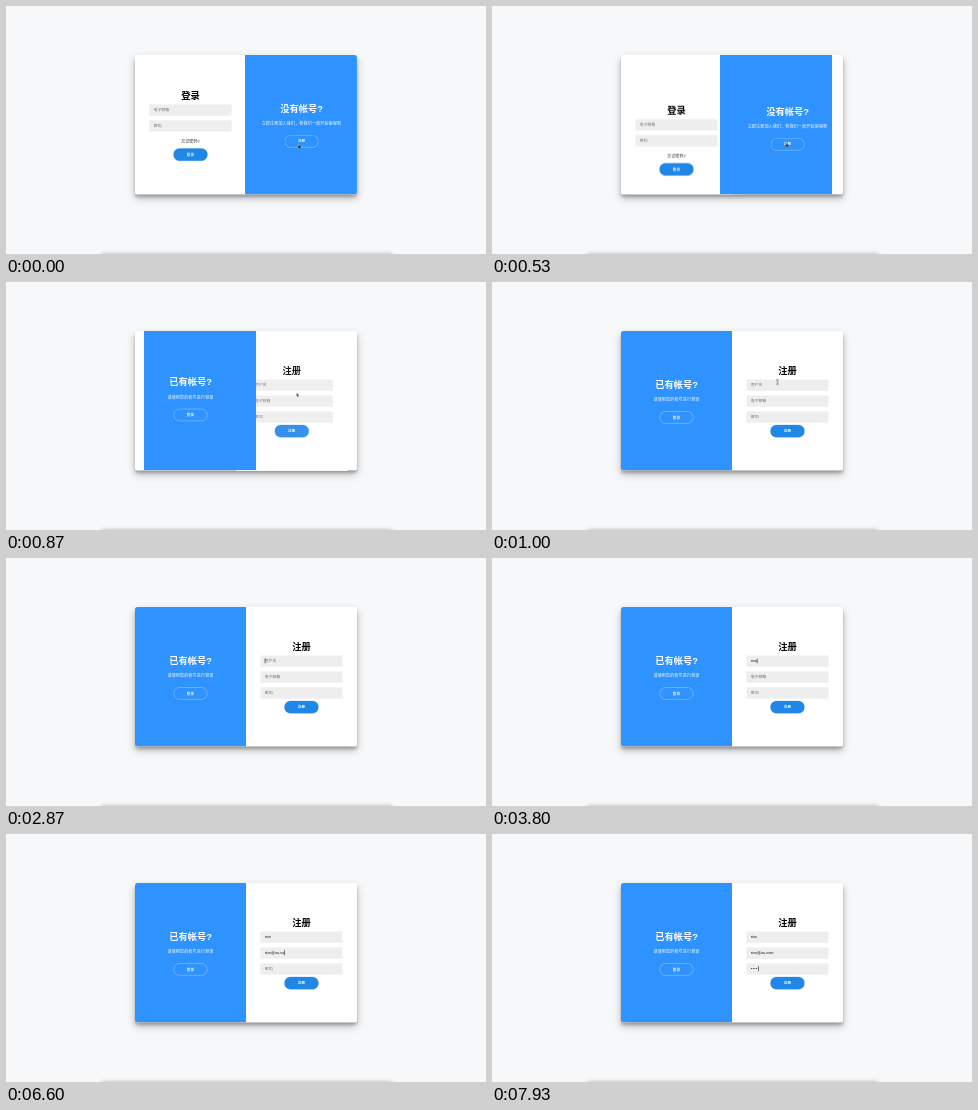
Recreate the animation shown at these times as an HTML page. Size 480 by 248 pixels, loop 8000 ms.

```html
<!DOCTYPE html>
<html lang="zh-CN">
<head>
<meta charset="utf-8">
<title>登录与注册</title>
<style>
* { box-sizing: border-box; }
html, body { margin: 0; width: 100%; height: 100%; overflow: hidden; }
body {
  position: relative;
  background: #f7f8fa;
  font-family: "Liberation Sans", "Noto Sans CJK SC", "Noto Sans CJK", sans-serif;
}
.below {
  position: absolute; left: 96px; top: 249px; width: 290px; height: 40px;
  box-shadow: 0 0 5px rgba(0, 0, 0, .45);
}
.card {
  position: absolute; left: 128.8px; top: 49px; width: 768px; height: 482px;
  transform: scale(.289); transform-origin: 0 0;
  border-radius: 9px; background: #fff;
  box-shadow: 0 14px 28px rgba(0, 0, 0, .25), 0 10px 10px rgba(0, 0, 0, .22);
}
.clip { position: absolute; inset: 0; overflow: hidden; border-radius: 9px; }

.form, .panel {
  position: absolute; top: 0; height: 100%;
  display: flex; flex-direction: column; align-items: center; justify-content: center;
}
.form { left: 0; width: 50%; padding: 0 50px; background: #fff; }
h1 { margin: 0; font-size: 32px; line-height: 46px; font-weight: 700; white-space: nowrap; }
.field {
  width: 100%; height: 39px; margin: 8px 0; padding: 0 15px;
  background: #eee; color: #111;
  font-size: 13.33px; line-height: 39px; white-space: pre;
}
.field.empty::after { content: attr(data-hint); color: #757575; }
.field.dots { letter-spacing: 1.5px; }
.field i {
  display: none; width: 2px; height: 17px; margin-right: -2px;
  background: #111; vertical-align: -3px;
}
.field.caret i { display: inline-block; }
.forgot { font-size: 14px; line-height: 50px; color: #333; }
.btn {
  padding: 12px 45px; border: 1px solid #2187e7; border-radius: 20px;
  background: #2187e7; color: #fff;
  font-size: 12px; font-weight: 700; line-height: 17px; letter-spacing: 1px; white-space: nowrap;
}
.ghost { padding: 11.4px 44.4px; border: 1.6px solid #fff; background: none; }

.cover { position: absolute; left: 50%; top: 0; width: 50%; height: 100%; overflow: hidden; z-index: 100; }
.blue { position: absolute; left: -100%; top: 0; width: 200%; height: 100%; background: #2e92ff; color: #fff; }
.panel { width: 50%; }
.panel.right { left: 50%; }
.panel p { margin: 20px 0 30px; font-size: 14px; line-height: 20px; letter-spacing: .5px; white-space: nowrap; }

/* the swap runs from 395 ms to 995 ms of the 8 s loop */
.signin, .signup, .cover, .blue, .panel, .press, .cursor { animation: 8s linear infinite both; }
.signin { z-index: 2; animation-name: drop; }
.signup { animation-name: enter; }
.cover { animation-name: cover; }
.blue { animation-name: counter; }
.panel.left { animation-name: panel-in; }
.panel.right { animation-name: panel-out; }
.press { animation-name: press; }
@keyframes drop {
  0%, 4.9375% { transform: none; animation-timing-function: ease-in-out; }
  12.4375%, 100% { transform: translateY(100%); }
}
@keyframes enter {
  0%, 4.9375% { transform: none; opacity: 0; z-index: 1; animation-timing-function: ease-in-out; }
  12.4375%, 100% { transform: translateX(100%); opacity: 1; z-index: 5; }
}
@keyframes cover {
  0%, 4.9375% { transform: none; animation-timing-function: ease-in-out; }
  12.4375%, 100% { transform: translateX(-100%); }
}
@keyframes counter {
  0%, 4.9375% { transform: none; animation-timing-function: ease-in-out; }
  12.4375%, 100% { transform: translateX(50%); }
}
@keyframes panel-in {
  0%, 4.9375% { transform: translateY(-20%); animation-timing-function: ease-in-out; }
  12.4375%, 100% { transform: none; }
}
@keyframes panel-out {
  0%, 4.9375% { transform: none; animation-timing-function: ease-in-out; }
  12.4375%, 100% { transform: translateY(20%); }
}
@keyframes press {
  0%, 3.2% { transform: none; }
  4.2%, 4.9% { transform: scale(.95); }
  5.9%, 100% { transform: none; }
}

.cursor { position: absolute; left: 0; top: 0; width: 1px; height: 1px; overflow: visible; animation-name: roam; }
.cursor path { display: none; stroke-linejoin: round; }
.cursor[data-shape="hand"] .hand,
.cursor[data-shape="arrow"] .arrow,
.cursor[data-shape="beam"] .beam { display: inline; }
@keyframes roam {
  0%, 3% { transform: translate(292.8px, 138px); }
  5%, 6.7% { transform: translate(294.5px, 136.5px); }
  9.125% { transform: translate(296px, 122.5px); }
  12.5%, 13.375% { transform: translate(285.5px, 100px); }
  15%, 100% { transform: translate(287.5px, 101px); }
}
</style>
</head>
<body>
<div class="below"></div>
<div class="card">
  <div class="clip">
    <div class="form signup">
      <h1>注册</h1>
      <div class="field" data-hint="用户名"><span></span><i></i></div>
      <div class="field" data-hint="电子邮箱"><span></span><i></i></div>
      <div class="field" data-hint="密码"><span></span><i></i></div>
      <div class="btn">注册</div>
    </div>
    <div class="form signin">
      <h1>登录</h1>
      <div class="field empty" data-hint="电子邮箱"></div>
      <div class="field empty" data-hint="密码"></div>
      <div class="forgot">忘记密码?</div>
      <div class="btn">登录</div>
    </div>
    <div class="cover">
      <div class="blue">
        <div class="panel left">
          <h1>已有帐号?</h1>
          <p>请使用您的帐号进行登录</p>
          <div class="btn ghost">登录</div>
        </div>
        <div class="panel right">
          <h1>没有帐号?</h1>
          <p>立即注册加入我们，和我们一起开始旅程吧</p>
          <div class="btn ghost press">注册</div>
        </div>
      </div>
    </div>
  </div>
</div>
<svg class="cursor" data-shape="hand">
  <path class="hand" d="M-.4 .3Q0-.2 .4 .3V1.6L2 2V3.2L1.5 4.4H-.3L-1.3 2.7L-.9 2.3L-.4 2.7Z" fill="#111" stroke="#fff" stroke-width=".3"/>
  <path class="arrow" d="M0 0V3.8L.9 3L1.5 4.4L2.1 4.1L1.5 2.8H2.7Z" fill="#111" stroke="#fff" stroke-width=".3"/>
  <path class="beam" d="M-.9-2.4Q0-2.4 0-1.8Q0-2.4 .9-2.4M0-1.8V1.8M-.9 2.4Q0 2.4 0 1.8Q0 2.4 .9 2.4" fill="none" stroke="#333" stroke-width=".6"/>
</svg>
<script>
const LOOP = 8000;
const fields = [
  { text: "rivo", focus: 1400, blur: 4130, keys: [2870, 3130, 3400, 3600] },
  { text: "rivo@uu.vom", focus: 4130, blur: 6930,
    keys: [4870, 5070, 5200, 5330, 5470, 5670, 5800, 6000, 6400, 6530, 6600] },
  { text: "••••", focus: 6930, blur: LOOP, keys: [7130, 7330, 7530, 7800] }
];
const boxes = document.querySelectorAll(".signup .field");
const cursor = document.querySelector(".cursor");
const clock = document.querySelector(".signin").getAnimations()[0];
boxes[2].classList.add("dots");

function drawField(field, box, t) {
  const pressed = field.keys.filter(k => k <= t);
  const since = t - Math.max(field.focus, ...pressed);
  const active = t >= field.focus && t < field.blur;
  box.firstChild.textContent = field.text.slice(0, pressed.length);
  box.classList.toggle("empty", !pressed.length);
  box.classList.toggle("caret", active && since % 1000 < 500);
}

function draw() {
  const t = (clock.currentTime || 0) % LOOP;
  fields.forEach((field, n) => drawField(field, boxes[n], t));
  cursor.dataset.shape = t < 560 ? "hand" : t < 960 ? "arrow" : t < 1430 ? "beam" : "none";
  requestAnimationFrame(draw);
}
draw();
</script>
</body>
</html>
```
